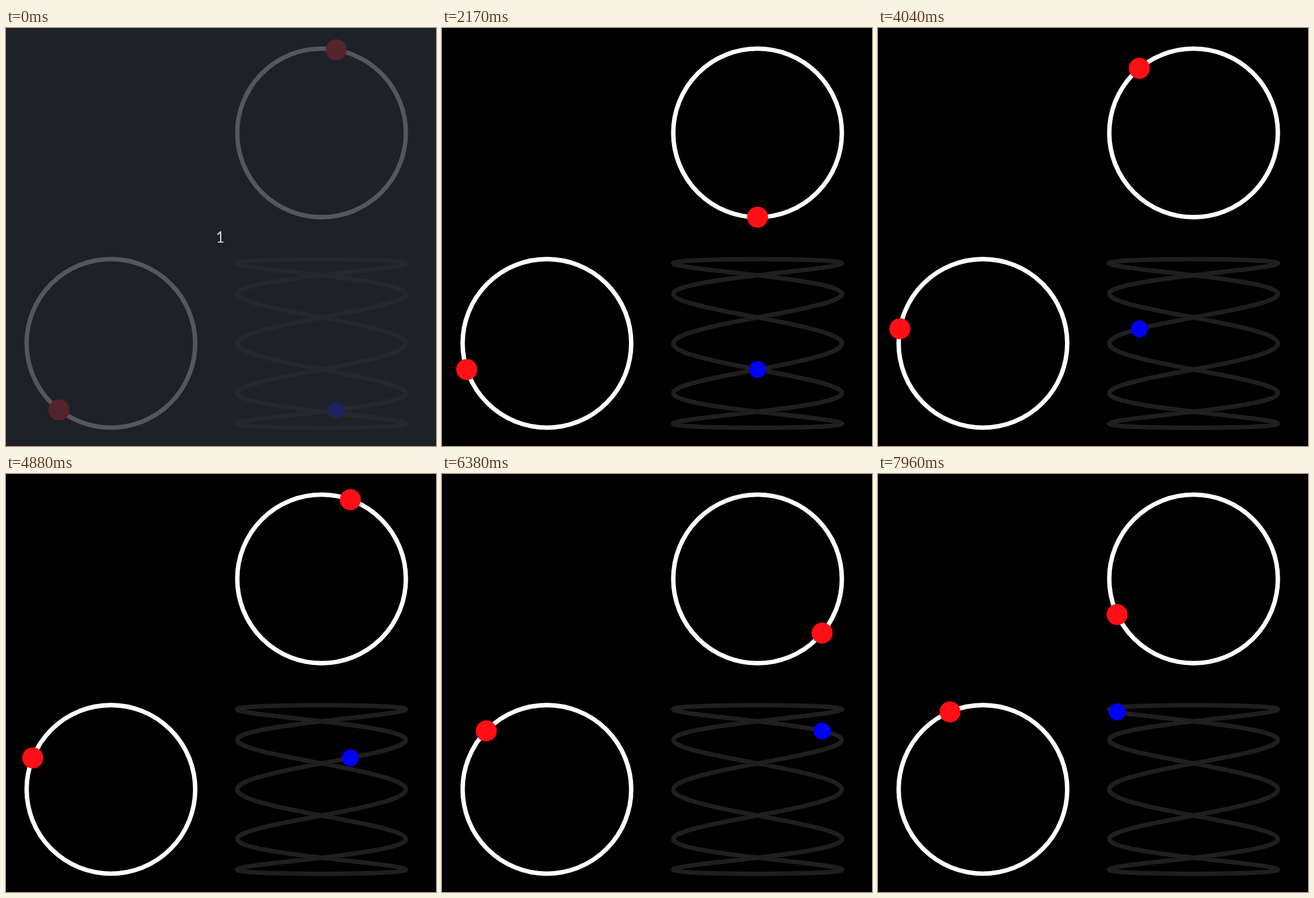
Write an HTML page with a canvas that moves like this. It is 759 by 738 pixels and loops after 8000 ms.

```html
<!DOCTYPE html>
<html lang="en">
<head>
<meta charset="utf-8">
<title>Lissajous curve</title>
<style>
  html, body { margin: 0; width: 100%; height: 100%; overflow: hidden; background: #000; }
  canvas { display: block; }
</style>
</head>
<body>
<canvas id="stage" width="759" height="738"></canvas>
<script>
const ctx = document.getElementById('stage').getContext('2d');
const LOOP = 8000;
const TICK = 1000 / 24;
const LAST_TICK = 191;
const NEAR = 185.2, FAR = 557;
const R = 148.8;
const RATIO = 5;
const RAD = Math.PI / 180;
const RED = '#ff1016', BLUE = '#00f';

// Whole degrees at a steady pace, after a short lag at the start
function angleAt(tick) {
  return Math.floor(130.22 + 0.6165 * tick - 1.6 * Math.exp(-tick / 5));
}

const cos = deg => R * Math.cos(deg * RAD);
const sin = deg => R * Math.sin(deg * RAD);

function ring(x, y) {
  ctx.beginPath();
  ctx.arc(x, y, R, 0, 2 * Math.PI);
  ctx.strokeStyle = '#fff';
  ctx.stroke();
}

function dot(x, y, r, color) {
  ctx.beginPath();
  ctx.arc(x, y, r, 0, 2 * Math.PI);
  ctx.fillStyle = color;
  ctx.fill();
}

function curve() {
  ctx.beginPath();
  for (let d = 0; d < 360; d++) ctx.lineTo(FAR + cos(RATIO * d), FAR + sin(d));
  ctx.closePath();
  ctx.strokeStyle = '#201f1e';
  ctx.stroke();
}

function countdown() {
  ctx.fillStyle = 'rgba(39, 43, 51, 0.79)';
  ctx.fillRect(0, 0, 759, 738);
  ctx.fillStyle = '#d8d3dc';
  ctx.font = '26px Lato, "Open Sans", sans-serif';
  ctx.textAlign = 'center';
  ctx.fillText('1', 378, 379);
}

function draw(time) {
  const tick = Math.min(LAST_TICK, Math.floor((time + 5) / TICK));
  const deg = angleAt(tick);
  const x = FAR + cos(RATIO * deg), y = FAR + sin(deg);

  ctx.fillStyle = '#000';
  ctx.fillRect(0, 0, 759, 738);
  ctx.lineWidth = 7.8;
  ring(FAR, NEAR);
  ring(NEAR, FAR - 0.2);
  curve();
  dot(x, NEAR + sin(RATIO * deg), 18.6, RED);
  dot(NEAR + cos(deg), y, 18.6, RED);
  dot(x, y, 15, BLUE);
  if (tick === 0) countdown();
}

const start = performance.now();
function frame() {
  draw((performance.now() - start) % LOOP);
  requestAnimationFrame(frame);
}
frame();
</script>
</body>
</html>
```
